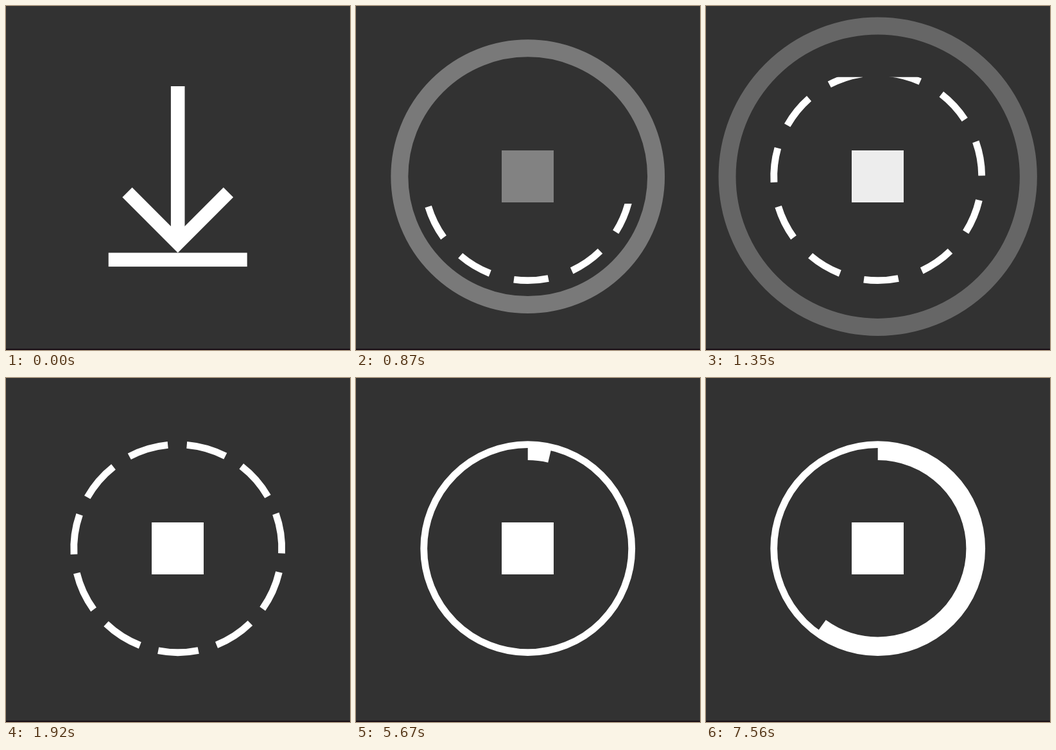
An HTML page with a canvas that plays this animation: 536x536 px, repeating every 8000 ms.

```html
<!DOCTYPE html>
<html lang="en">
<head>
<meta charset="utf-8">
<title>Download button</title>
<style>
  html, body { margin: 0; width: 100%; height: 100%; overflow: hidden; background: #323232; }
  canvas { display: block; width: 100vw; height: 100vh; }
</style>
</head>
<body>
<canvas id="stage" width="536" height="536"></canvas>
<script>
const ctx = document.getElementById('stage').getContext('2d');
const LOOP = 8000, BG = '#323232', U = 5.4;   // U: one icon unit in pixels
const CX = 267.7, CY = 265.7, R = 30 * U;
const DASHES = 11, FIRST = 13.15, STEP = 360 / DASHES, SHORT = 19.1, SEAM = 72.3;

const clamp = x => Math.max(0, Math.min(1, x));
const span = (t, start, length) => clamp((t - start) / length);
const outCubic = p => 1 - (1 - p) ** 3;
const rad = deg => deg * Math.PI / 180;

function arc(r, width, from = 0, to = 360) {
  ctx.lineWidth = width;
  ctx.beginPath();
  ctx.arc(CX, CY, r, rad(from), rad(to));
  ctx.stroke();
}

function arrow() {
  const tip = 384.5, w = 4 * U, reach = 16 * U, d = w / Math.SQRT2;
  ctx.fillRect(CX - w / 2, 125, w, 235);
  ctx.fillRect(CX - 20 * U, tip, 40 * U, w);
  ctx.beginPath();
  ctx.moveTo(CX, tip);
  ctx.lineTo(CX - reach, tip - reach);
  ctx.lineTo(CX - reach + d, tip - reach - d);
  ctx.lineTo(CX, tip - 2 * d);
  ctx.lineTo(CX + reach - d, tip - reach - d);
  ctx.lineTo(CX + reach, tip - reach);
  ctx.fill();
}

function stopSquare(alpha) {
  ctx.globalAlpha = alpha;
  ctx.fillRect(227, 225, 15 * U, 15 * U);
  ctx.globalAlpha = 1;
}

function ripple(t, alpha) {
  if (t >= 1560) return;
  const outer = 256 - 63 * ((1580 - t) / 920) ** 1.5;
  ctx.globalAlpha = alpha * (1 - span(t, 786, 784));
  arc(outer - 2.5 * U, 5 * U);
  ctx.globalAlpha = 1;
}

function dashes(t, reveal) {
  const length = SHORT + (STEP - SHORT) * outCubic(span(t, 1820, 1200));
  const top = 454 - 376 * reveal;
  ctx.save();
  ctx.beginPath();
  ctx.rect(0, top, 536, 536 - top);
  ctx.clip();
  if (STEP - length < 0.01) {
    arc(R, 2 * U);
  } else {
    for (let i = 0; i < DASHES; i++) {
      const from = FIRST + i * STEP;
      arc(R, 2 * U, from, from + length);
    }
  }
  if (FIRST + STEP + length > SEAM) {
    ctx.strokeStyle = BG;
    ctx.globalAlpha = 0.5;
    arc(R, 2 * U, SEAM - 0.11, SEAM + 0.11);
  }
  ctx.restore();
}

function progress(t) {
  const angle = 90 * outCubic(span(t, 5640, 600)) + 126 * outCubic(span(t, 6960, 600));
  arc(R, 2 * U);
  arc(28 * U, 5 * U, -90, angle - 90);
}

function draw(t) {
  ctx.fillStyle = BG;
  ctx.fillRect(0, 0, 536, 536);
  ctx.fillStyle = '#1a0f16';
  ctx.fillRect(0, 534, 536, 2);
  ctx.fillStyle = ctx.strokeStyle = '#fff';
  if (t < 420) return arrow();

  const fade = span(t, 516, 915);
  if (fade > 0) ripple(t, fade);
  stopSquare(fade);
  if (t < 5660) dashes(t, fade);
  else progress(t);
}

const start = performance.now();
function tick() {
  draw((performance.now() - start) % LOOP);
  requestAnimationFrame(tick);
}
tick();
</script>
</body>
</html>
```
